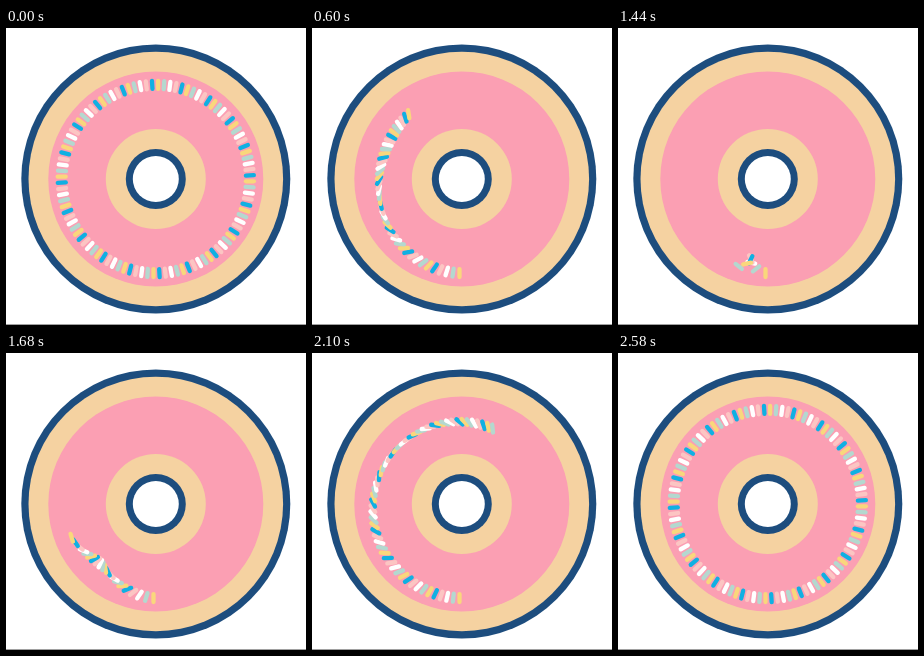
An HTML page with a canvas that plays this animation: 300x297 px, repeating every 3000 ms.

```html
<!DOCTYPE html>
<html lang="en">
<head>
<meta charset="utf-8">
<title>Donut sprinkles</title>
<style>
  html, body { margin: 0; width: 100%; height: 100%; overflow: hidden; background: #fff; }
  canvas { display: block; }
</style>
</head>
<body>
<canvas id="stage" width="300" height="297"></canvas>
<script>
const ctx = document.getElementById('stage').getContext('2d');
const LOOP = 3000, STEP = 60, TOTAL = 100, TAU = 2 * Math.PI;
const CX = 149.8, CY = 151, PIVOT_RADIUS = 88;
const SPRINKLES = ['#f9d77c', '#b4d8cf', '#ffffff', '#fcc5c3', '#10b0e2'];

// [time in ms, number of sprinkles]
const KEYS = [[0, 100], [60, 100], [360, 67], [900, 11], [1140, 4], [1260, 4],
              [1440, 7], [1920, 39], [2340, 83], [2560, 100], [LOOP, 100]];

function slope(k) {
  const a = KEYS[k - 1], b = KEYS[k + 1];
  return a && b ? (b[1] - a[1]) / (b[0] - a[0]) : 0;
}

// Smooth (Hermite) interpolation of the sprinkle count.
function countAt(time) {
  const k = KEYS.findIndex(key => key[0] > time) - 1;
  const [t0, n0] = KEYS[k], [t1, n1] = KEYS[k + 1];
  const d = t1 - t0, u = (time - t0) / d, v = 1 - u;
  const n = n0 * v * v * (1 + 2 * u) + n1 * u * u * (1 + 2 * v)
          + d * u * v * (slope(k) * v - slope(k + 1) * u);
  return Math.min(TOTAL, Math.round(n));
}

function disc(radius, color) {
  ctx.fillStyle = color;
  ctx.beginPath();
  ctx.arc(CX, CY, radius, 0, TAU);
  ctx.fill();
}

function drawDonut() {
  ctx.fillStyle = '#fff';
  ctx.fillRect(0, 0, 300, 297);
  disc(134.5, '#1d4d7e');
  disc(127.3, '#f5d2a1');
  disc(107.5, '#fb9fb3');
  disc(50, '#f5d2a1');
  disc(30, '#1d4d7e');
  disc(23, '#fff');
  ctx.fillStyle = '#a0a0a0';
  ctx.fillRect(0, 296, 300, 1);
}

// Places on the ring are fixed; the tilts always share one full turn.
function drawSprinkle(i, count) {
  const place = TAU * i / TOTAL;
  ctx.save();
  ctx.translate(CX - PIVOT_RADIUS * Math.sin(place), CY + PIVOT_RADIUS * Math.cos(place));
  ctx.rotate(TAU * i / count);
  ctx.strokeStyle = SPRINKLES[i % SPRINKLES.length];
  ctx.beginPath();
  ctx.moveTo(-2.3, 2.1);
  ctx.lineTo(-2.3, 10.1);
  ctx.stroke();
  ctx.restore();
}

function frame() {
  const time = performance.now() % LOOP;
  const count = countAt(time - time % STEP);
  drawDonut();
  ctx.lineWidth = 4.3;
  ctx.lineCap = 'round';
  for (let i = 0; i < count; i++) drawSprinkle(i, count);
  requestAnimationFrame(frame);
}
frame();
</script>
</body>
</html>
```
